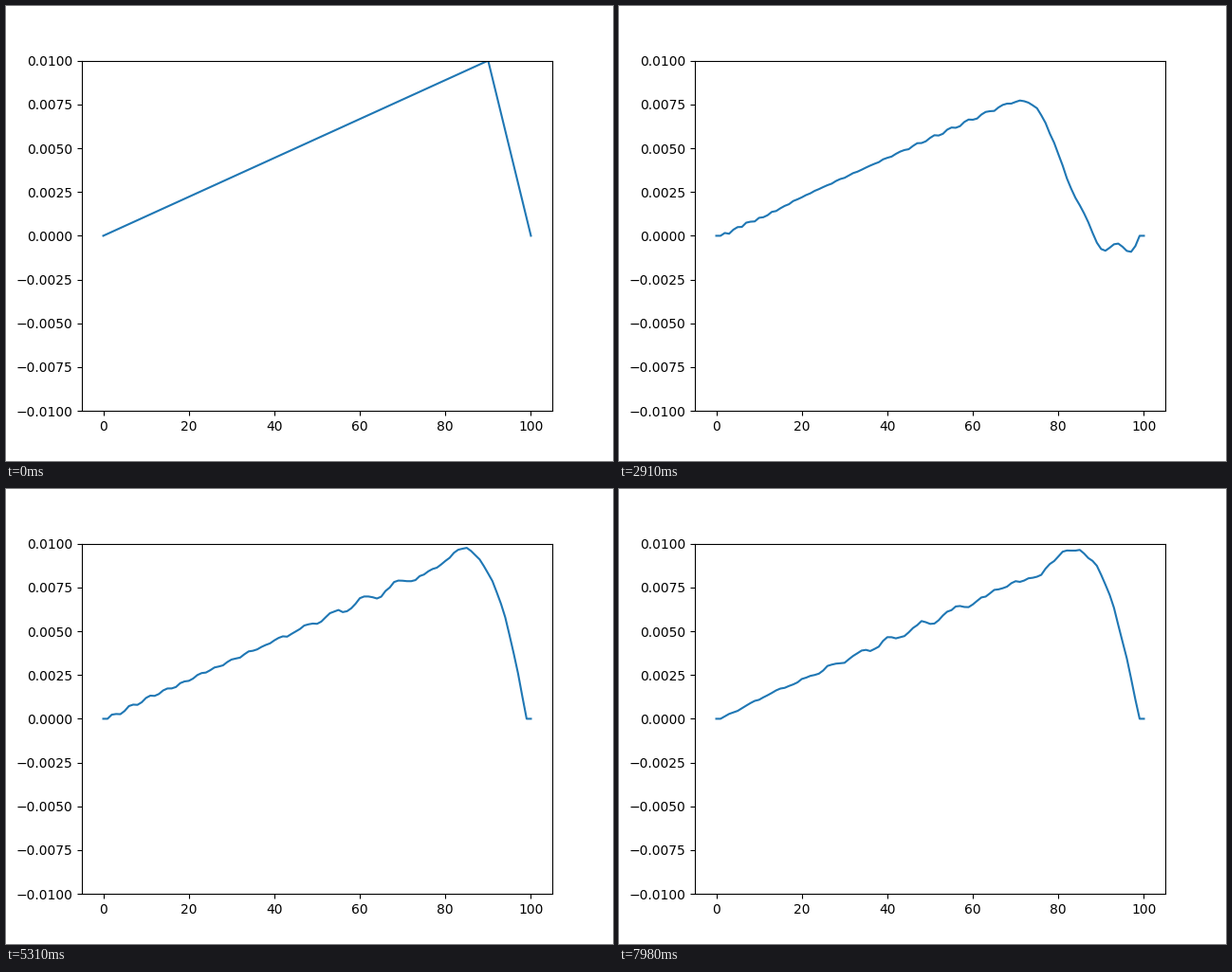
A matplotlib script that plays this animation: 640x480 px, repeating every 8 s.

```python
import numpy as np
import matplotlib.pyplot as plt
from matplotlib.animation import FuncAnimation

FRAMES = 267
LOOP_MS = 8000
N = 100          # string segments
PLUCK = 90       # plucked point
HEIGHT = 0.01
SPEED = 2.2      # segments travelled per frame
SUBSTEPS = 10


def simulate():
    """Finite-difference wave equation for a plucked string, one row per frame."""
    x = np.arange(N + 1)
    start = np.where(x <= PLUCK, HEIGHT * x / PLUCK,
                     HEIGHT * (N - x) / (N - PLUCK))
    rows = [start]
    ratio = (SPEED / SUBSTEPS) ** 2

    now = start.copy()
    now[[1, -2]] = 0
    before = now.copy()
    for step in range(1, (FRAMES - 1) * SUBSTEPS + 1):
        after = np.zeros(N + 1)
        bend = now[3:-1] - 2 * now[2:-2] + now[1:-3]
        # the string starts at rest, so the first step is halved
        gain = ratio / 2 if step == 1 else ratio
        after[2:-2] = 2 * now[2:-2] - before[2:-2] + gain * bend
        before, now = now, after
        if step % SUBSTEPS == 0:
            rows.append(now)
    return x, rows


x, rows = simulate()

fig, ax = plt.subplots(figsize=(6.4, 4.8), dpi=100)
line, = ax.plot(x, rows[0])
ax.set_ylim(-HEIGHT, HEIGHT)


def draw(i):
    line.set_ydata(rows[i])
    return line,


anim = FuncAnimation(fig, draw, frames=FRAMES, interval=LOOP_MS / FRAMES,
                     init_func=lambda: draw(0), repeat=True, repeat_delay=0)
plt.show()
```
